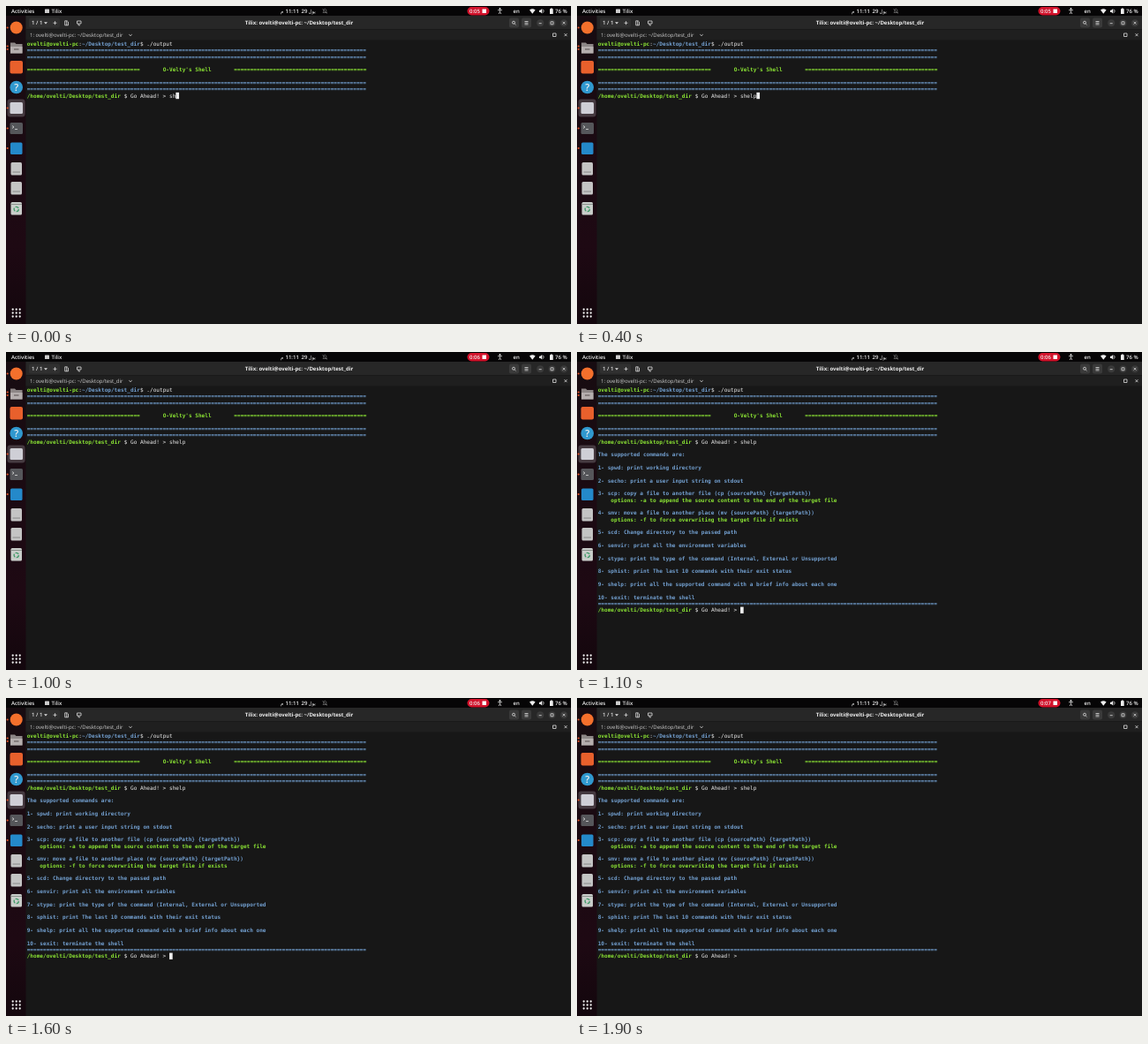
Animation of 640 by 360 pixels, one loop 2000 ms. Source, as an HTML page:

```html
<!DOCTYPE html>
<html lang="en">
<head>
<meta charset="utf-8">
<title>Shell session</title>
<style>
  html, body { margin: 0; width: 100%; height: 100%; overflow: hidden; background: #171717; }
  svg { display: block; width: 640px; height: 360px; }
  text { white-space: pre; text-rendering: geometricPrecision; fill: #eee; }
  .ui text { font: 600 6px "Open Sans", sans-serif; }
  .ui .regular { font-weight: 400; fill: #ccc; }
  .ui .title { font-weight: 700; text-anchor: middle; }
  .ui .arabic { font: 5.5px "DejaVu Sans", sans-serif; }
  .line { fill: none; stroke: #ddd; stroke-width: .8; }
  #terminal text { font: 6.09px "DejaVu Sans Mono", monospace; }
  #terminal .g, #terminal .b { font-weight: 700; }
  #terminal .g { fill: #8ae234; }
  #terminal .b { fill: #729fcf; }
</style>
</head>
<body>
<svg viewBox="0 0 640 360">
  <defs>
    <linearGradient id="dock" x2="0" y2="1">
      <stop stop-color="#170c11"/>
      <stop offset=".75" stop-color="#1e0913"/>
      <stop offset="1" stop-color="#13070d"/>
    </linearGradient>
  </defs>
  <rect width="640" height="360" fill="#171717"/>

  <g class="ui" id="dockBar">
    <rect y="11" width="22.5" height="349" fill="url(#dock)"/>
    <rect x="1.5" y="105.5" width="20" height="20" rx="3" fill="#453a40"/>
    <circle cx="11.7" cy="24.5" r="7" fill="#f4702c"/>
    <path d="M5 41.5h5l1.5 1.5h7v10.500h-13.500z" fill="#8d8686"/>
    <path d="M5 46h13.500v7.500h-13.500z" fill="#b5aeae"/>
    <path d="M9 49h5.500" stroke="#655d5d" stroke-width="1.200"/>
    <rect x="4.500" y="62" width="14.500" height="14.500" rx="2" fill="#e8602c"/>
    <circle cx="11.700" cy="92" r="7.300" fill="#3098cf"/>
    <text x="11.700" y="95.800" text-anchor="middle" style="font-size:11px">?</text>
    <rect x="4.500" y="109" width="14.500" height="13" rx="1.500" fill="#cfcfd6"/>
    <rect x="4.500" y="132" width="14.500" height="13" rx="1.500" fill="#55565a"/>
    <path class="line" d="M7 135.500l2 1.500-2 1.500M10 139.500h3"/>
    <rect x="5" y="154.500" width="13.500" height="13.500" rx="1.500" fill="#2489ca"/>
    <g id="drives"></g>
    <rect x="5.500" y="222" width="12.500" height="14.500" rx="1.500" fill="#c9cdca"/>
    <path d="M5.500 224.500h12.500" stroke="#8a8f8b"/>
    <circle cx="11.700" cy="230" r="2.600" fill="none" stroke="#3d9a67" stroke-width="1.300" stroke-dasharray="4 1.440"/>
    <g id="dots" fill="#e2552b"></g>
    <g id="grid" fill="#eee"></g>
  </g>

  <g class="ui">
    <rect width="640" height="11" fill="#060506"/>
    <text x="6" y="7.900">Activities</text>
    <rect x="44" y="3.500" width="5" height="4.500" rx=".5" fill="#ccc"/>
    <text x="51.500" y="7.900">Tilix</text>
    <text x="311" y="7.500" class="arabic">م</text>
    <text x="316.500" y="7.900">11:11</text>
    <text x="334.500" y="7.900">29</text>
    <text x="342.500" y="7.500" class="arabic">يول</text>
    <path class="line" d="M359 7.500h4.500l-.7-1.200v-2q-1.500-2.200-3 0v2zM358.500 3l5 5.500" style="stroke:#888;stroke-width:.6"/>
    <rect x="522.500" y="1" width="25" height="9.500" rx="4.700" fill="#d3122b"/>
    <text x="525" y="7.900" id="timer"></text>
    <rect x="539.500" y="3.500" width="4.500" height="4.500" fill="#fff"/>
    <circle cx="559.500" cy="3" r=".9" fill="#eee"/>
    <path class="line" d="M557 4.700h5M559.500 4.700v2l-1.300 2.300M559.500 6.700l1.300 2.300"/>
    <text x="574.500" y="7.900">en</text>
    <path d="M593 4.500q3.300-2.600 6.600 0l-3.300 4.200z" fill="#eee"/>
    <path d="M604 4.700h1.300l2-1.700v5.600l-2-1.700h-1.300z" fill="#eee"/>
    <path class="line" d="M608.500 4q1.300 1.700 0 3.500"/>
    <path d="M616 3.300h1v-.8h1.700v.8h1v5.700h-3.700z" fill="#eee"/>
    <text x="622" y="7.900">76 %</text>

    <rect x="22.500" y="11" width="617.500" height="16" fill="#272727"/>
    <path d="M22.500 26.700H640" stroke="#111" stroke-width=".7"/>
    <rect x="26" y="13.500" width="35" height="11" rx="2" fill="#303030"/>
    <text x="29" y="21.200">1 / 1</text>
    <path d="M43 18.300h4l-2 2.200z" fill="#ddd"/>
    <path class="line" d="M53.500 19.200h4M55.500 17.200v4M66.700 16.800h2.500l1.300 1.300v3.700h-3.800zM68.700 17v5M80.500 17h4.500v3h-4.500zM82 20v1.800h2"/>
    <text x="332" y="21.300" class="title">Tilix: ovelti@ovelti-pc: ~/Desktop/test_dir</text>
    <g id="buttons" fill="#3a3a3a"></g>
    <circle class="line" cx="575" cy="18.700" r="1.500"/>
    <path class="line" d="M576.200 20l1.300 1.300M587.500 17.500h4M587.500 19.200h4M587.500 20.900h4"/>
    <path class="line" d="M603.700 19.700h3M617 17.800h3v3h-3zM630.600 17.800l2.800 2.800m0-2.800l-2.800 2.800"/>

    <rect x="22.500" y="27" width="617.500" height="11.500" fill="#1f1f1f"/>
    <text x="27" y="35.100" class="regular">1: ovelti@ovelti-pc: ~/Desktop/test_dir</text>
    <path class="line" d="M139.300 32.200l1.700 1.500 1.700-1.500M619.500 31h3.500v3.500h-3.500zM632.500 31.200l3 3m0-3l-3 3"/>
  </g>

  <g id="terminal">
    <g id="banner"></g>
    <g id="help"></g>
    <text id="typed"></text>
    <rect id="cursor" width="3.667" height="7.333" fill="#eee"/>
  </g>
</svg>
<script>
const $ = id => document.getElementById(id);
const COL = 11 / 3, ROW = 22 / 3;
const colX = col => 23.7 + col * COL;
const rowY = row => 39.2 + row * ROW;
const baseline = row => rowY(row) + 5.9;

function put(parent, row, col, style, text) {
  $(parent).innerHTML +=
    `<text x="${colX(col)}" y="${baseline(row)}" class="${style}">${text}</text>`;
}

const rule = n => '='.repeat(n);

function prompt(parent, row) {
  put(parent, row, 0, 'g', '/home/ovelti/Desktop/test_dir');
  put(parent, row, 30, 'w', '$ Go Ahead! &gt;');
}

put('banner', 0, 0, 'g', 'ovelti@ovelti-pc');
put('banner', 0, 16, 'w', ':');
put('banner', 0, 17, 'b', '~/Desktop/test_dir');
put('banner', 0, 35, 'w', '$ ./output');
for (const row of [1, 2, 6, 7]) put('banner', row, 0, 'b', rule(105));
put('banner', 4, 0, 'g', rule(35));
put('banner', 4, 42, 'g', "O-Velty's Shell");
put('banner', 4, 64, 'g', rule(41));
prompt('banner', 8);

const commands = [
  ['spwd: print working directory'],
  ['secho: print a user input string on stdout'],
  ['scp: copy a file to another file (cp {sourcePath} {targetPath})',
    'options: -a to append the source content to the end of the target file'],
  ['smv: move a file to another place (mv {sourcePath} {targetPath})',
    'options: -f to force overwriting the target file if exists'],
  ['scd: Change directory to the passed path'],
  ['senvir: print all the environment variables'],
  ['stype: print the type of the command (Internal, External or Unsupported'],
  ['sphist: print The last 10 commands with their exit status'],
  ['shelp: print all the supported command with a brief info about each one'],
  ['sexit: terminate the shell']
];
put('help', 10, 0, 'b', 'The supported commands are:');
let row = 12;
commands.forEach(([usage, options], i) => {
  put('help', row++, 0, 'b', `${i + 1}- ${usage}`);
  if (options) put('help', row++, 4, 'g', options);
  row++;
});
put('help', 33, 0, 'b', rule(105));
prompt('help', 34);

// Repeated dock and title bar parts
for (const y of [177, 199]) $('drives').innerHTML +=
  `<rect x="5.500" y="${y}" width="12.500" height="14.500" rx="1.500" fill="#c4c4c4"/>
   <path d="M7.500 ${y + 11}h8.500" stroke="#888"/>`;
for (const y of [24.5, 45.5, 49, 115.5, 138.5, 161])
  $('dots').innerHTML += `<circle cx="1.700" cy="${y}" r="1.100"/>`;
for (let i = 0; i < 9; i++) $('grid').innerHTML +=
  `<circle cx="${7.7 + i % 3 * 4}" cy="${343.5 + Math.floor(i / 3) * 4}" r="1.150"/>`;
for (const x of [570, 584]) $('buttons').innerHTML +=
  `<rect x="${x}" y="13.500" width="11" height="11" rx="2"/>`;
for (const x of [605.2, 618.5, 632])
  $('buttons').innerHTML += `<circle cx="${x}" cy="19.200" r="4"/>`;

$('typed').setAttribute('x', colX(44));
$('typed').setAttribute('y', baseline(8));

function draw(t) {
  const length = 2 + Math.min(3, Math.floor(t / 100));
  const done = t >= 1100;
  $('typed').textContent = 'shelp'.slice(0, length);
  $('help').style.display = done ? '' : 'none';
  $('cursor').setAttribute('x', colX(done ? 44 : 44 + length));
  $('cursor').setAttribute('y', rowY(done ? 34 : 8));
  $('cursor').style.display = t < 900 || done && t < 1700 ? '' : 'none';
  $('timer').textContent = '0:0' + (t < 800 ? 5 : t < 1800 ? 6 : 7);
}

const start = performance.now();
function tick() {
  draw((performance.now() - start) % 2000);
  requestAnimationFrame(tick);
}
tick();
</script>
</body>
</html>
```
